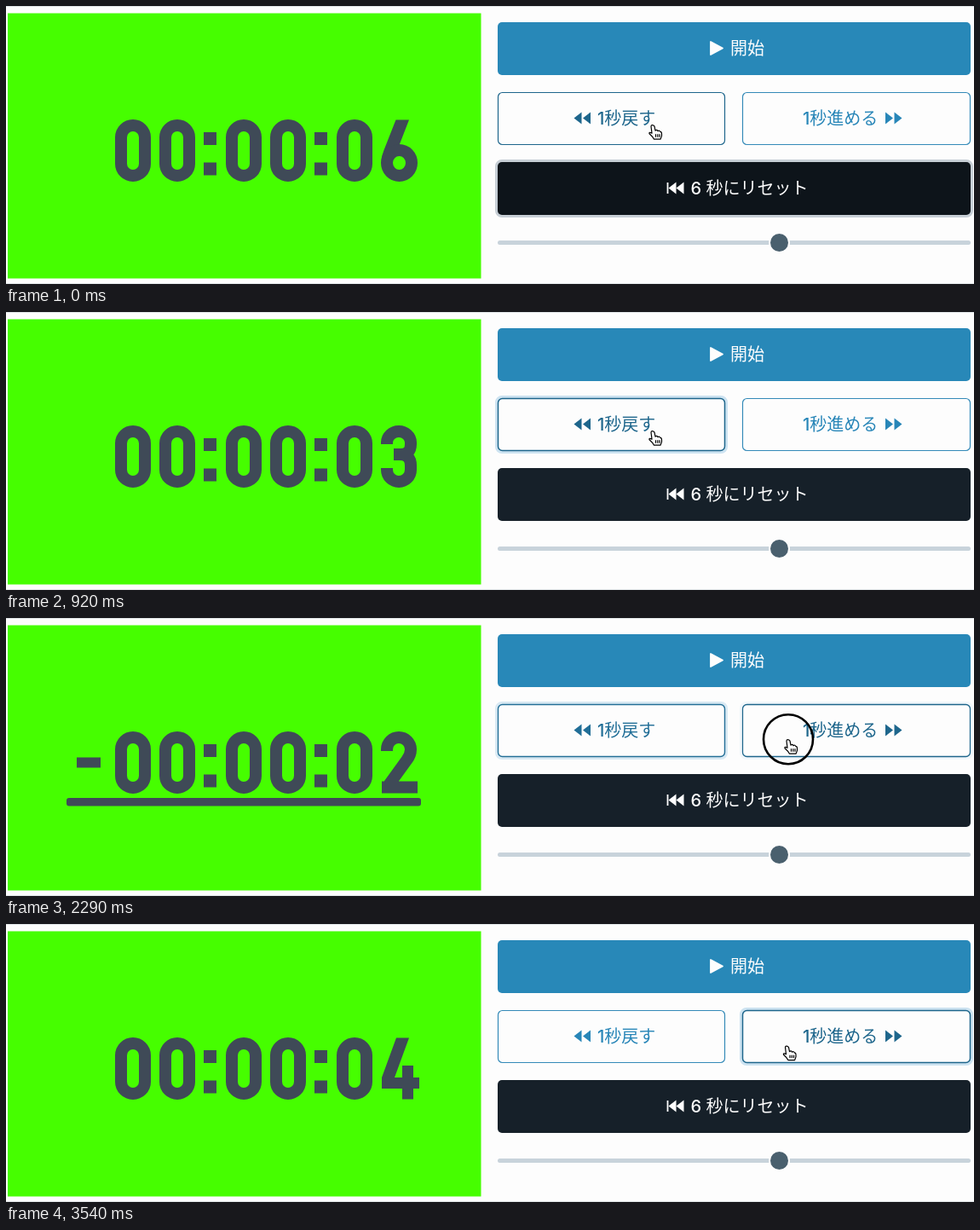
These frames come from a looping animation (1136 by 326 pixels, 3580 ms). An HTML page:

```html
<!DOCTYPE html>
<html lang="ja">
<head>
<meta charset="utf-8">
<title>Timer</title>
<style>
  html, body { margin: 0; width: 100%; height: 100%; overflow: hidden; background: #fdfdfd; }
  svg { display: block; width: 1136px; height: 326px; }
  text { font: 500 20px Inter, "Noto Sans CJK JP", "Noto Sans CJK", sans-serif; }
  .ink { fill: none; stroke: #3f4a57; stroke-width: 14; }
  .solid { fill: #3f4a57; }
  .label { stroke-width: 1.8; stroke-linejoin: round; }
  .label path { stroke: currentColor; }
  .label text { stroke: none; }
  .label, .label * { fill: currentColor; }
  .edge { fill: #fdfdfd; stroke-width: 1.2; }
  .halo { fill: none; stroke: #cde3f1; stroke-width: 4; }
</style>
</head>
<body>
<svg viewBox="0 0 1136 326">
  <defs>
    <path id="d0" class="ink" d="M7 21a14 14 0 0 1 28 0V52a14 14 0 0 1-28 0Z"/>
    <path id="d1" class="solid" d="M20 .5H33V72.5H19V16L7 27V12Z"/>
    <path id="d2" class="ink" d="M7 23V21a14 14 0 0 1 28 0q0 7-5 13L9 63M1 65.5H43"/>
    <path id="d3" class="ink" d="M7 22V20a14 13 0 0 1 28 0v2q0 12-12 12H15H22q13 0 13 13v5a14 14 0 0 1-28 0v-2"/>
    <path id="d4" class="solid" d="M18 .5H33L16 47H25V33H38V47H45V60H38V72.5H25V60H1V47Z"/>
    <path id="d5" class="ink" d="M40 7H9V37q5-6 12-6q14 0 14 16v5a14 14 0 0 1-28 0v-2"/>
    <g id="d6">
      <path class="solid" d="M17.500 .5H33L20 34L8 54L1 47Q1 42 3.500 36Z"/>
      <path class="ink" d="M7 51a14.500 15 0 0 1 29 0a14.500 15 0 0 1-29 0Z"/>
    </g>
    <path id="colon" class="solid" d="M0 15h15v15H0zM0 50.500h15v15H0z"/>
    <path id="tri" d="M10 1V15L1 8Z"/>
  </defs>

  <rect width="1136" height="1" fill="#dfe3e6"/>
  <rect y="325" width="1136" height="1" fill="#dfe3e6"/>
  <rect x="2" y="8.5" width="555.5" height="311" fill="#46fe00"/>

  <g transform="translate(128 133)">
    <use href="#d0"/>
    <use href="#d0" x="52"/>
    <use href="#colon" x="104"/>
    <use href="#d0" x="130"/>
    <use href="#d0" x="182"/>
    <use href="#colon" x="234"/>
    <use href="#d0" x="260"/>
    <use id="unit" href="#d6" x="312"/>
  </g>
  <g id="minus" class="solid">
    <rect x="83" y="163.5" width="28" height="12"/>
    <rect x="71" y="211" width="416" height="9.5" rx="3"/>
  </g>

  <rect x="577" y="19" width="555" height="62" rx="5" fill="#2888b8"/>
  <g class="label" color="#fdfdfd">
    <path d="M827 42V57L841 49.5Z"/>
    <text x="850" y="57">開始</text>
  </g>

  <g id="back">
    <rect class="halo" x="576" y="100" width="269" height="64" rx="6"/>
    <rect class="edge" x="577.5" y="101.5" width="266" height="61" rx="5"/>
    <g class="label">
      <use href="#tri" x="665.5" y="123.5"/>
      <use href="#tri" x="676" y="123.5"/>
      <text x="694" y="138.5">1秒戻す</text>
    </g>
  </g>
  <g id="next">
    <rect class="halo" x="863" y="100" width="270" height="64" rx="6"/>
    <rect class="edge" x="864.5" y="101.5" width="267" height="61" rx="5"/>
    <g class="label">
      <text x="935" y="138.5">1秒進める</text>
      <g transform="matrix(-1 0 0 1 1052.5 123.500)">
        <use href="#tri"/>
        <use href="#tri" x="10.5"/>
      </g>
    </g>
  </g>

  <rect id="glow" x="576" y="182" width="557" height="64" rx="6" fill="none" stroke="#c6ced5" stroke-width="4"/>
  <rect id="reset" x="577" y="183" width="555" height="62" rx="5"/>
  <g class="label" color="#fdfdfd">
    <path d="M776.500 207V220"/>
    <use href="#tri" x="776.5" y="205.5"/>
    <use href="#tri" x="785.5" y="205.5"/>
    <text x="803.5" y="220.5">6 秒にリセット</text>
  </g>

  <rect x="577" y="275" width="555" height="5" rx="2.5" fill="#c8d3db"/>
  <circle cx="907.5" cy="277.5" r="11.5" fill="#4a606e" stroke="#fdfdfd" stroke-width="2"/>

  <g id="pointer">
    <circle id="ring" r="29" fill="none" stroke="#000" stroke-width="2.6"/>
    <g fill="#fdfdfd" stroke="#000" stroke-width="1.2" stroke-linejoin="round">
      <path d="M-2 2Q-2 .5 -.5 .5T2 2L3 7Q5 5 6 7.500Q8 6 9 8.500Q10.500 8 10.500 11V13Q10 15 9 17H1.500Q0 14-4 10.500Q-4.500 8-1 10Z"/>
      <path d="M3.500 11V14.500M5.800 11V14.500M8 11V14.500"/>
    </g>
  </g>
</svg>
<script>
const LOOP = 3580, HOLD = 85, GAP = 175;
const BACK = { start: 400, clicks: 8 };
const NEXT = { start: 2260, clicks: 6 };
const $ = id => document.getElementById(id);
const clamp = v => Math.min(1, Math.max(0, v));
const ramp = (t, start, span) => clamp((t - start) / span);
const ease = p => p * p * (3 - 2 * p);
const lerp = (a, b, p) => a + (b - a) * p;
const mix = (a, b, p) => `rgb(${a.map((v, i) => Math.round(lerp(v, b[i], p)))})`;

// Number of finished clicks in a run
const done = (t, run) => Math.min(run.clicks, Math.max(0, Math.floor((t - run.start - HOLD) / GAP) + 1));

function pressed(t, run) {
  const age = t - run.start;
  return age >= 0 && age < run.clicks * GAP && age % GAP < HOLD;
}

function paintButton(id, active, focus) {
  const box = $(id);
  box.style.color = mix([40, 134, 184], [30, 102, 140], active);
  const edge = box.querySelector('.edge');
  edge.style.stroke = mix([52, 138, 184], [30, 102, 140], active);
  edge.style.strokeWidth = lerp(1.2, 1.5, focus);
  box.querySelector('.halo').style.opacity = focus;
}

function draw(now) {
  const t = now % LOOP;
  const count = 6 - done(t, BACK) + done(t, NEXT);
  $('unit').setAttribute('href', '#d' + Math.abs(count));
  $('minus').style.display = count < 0 ? '' : 'none';

  const move = ease(ramp(t, 1830, 400));
  const drift = ease(ramp(t, 3300, 200));
  const x = lerp(759, 918, move) - 1.5 * drift;
  const y = lerp(139.2, 142.2, move) + 0.5 * drift;
  $('pointer').setAttribute('transform', `translate(${x} ${y})`);
  $('ring').style.display = pressed(t, BACK) || pressed(t, NEXT) ? '' : 'none';

  const first = ramp(t, BACK.start, 60);
  const second = ramp(t, NEXT.start, 120);
  paintButton('back', 1 - second, first * (1 - second));
  paintButton('next', clamp((x - 864) / 30), second);
  $('glow').style.opacity = 1 - first;
  $('reset').style.fill = mix([13, 20, 26], [22, 32, 41], first);
}

const origin = performance.now();
function tick() {
  draw(performance.now() - origin);
  requestAnimationFrame(tick);
}
tick();
</script>
</body>
</html>
```
